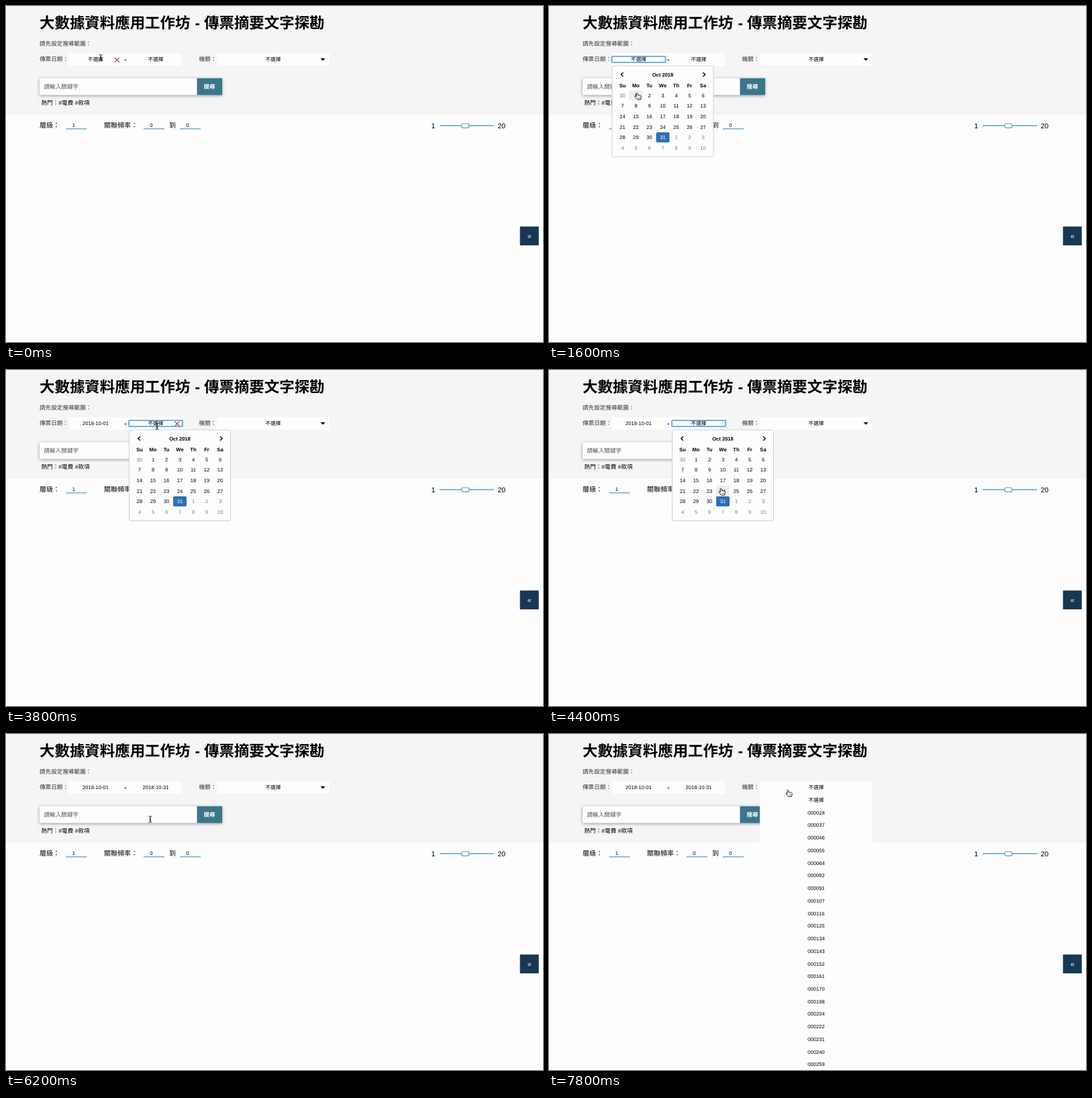
An HTML page that plays this animation: 800 px wide and 500 px high, repeating every 8000 ms.

```html
<!DOCTYPE html>
<html lang="zh-TW">
<head>
<meta charset="utf-8">
<style>
  html, body { margin: 0; width: 100%; height: 100%; overflow: hidden; background: #fdfdfe; }
  svg { display: block; font-family: "Liberation Sans", "Noto Sans CJK TC", "Noto Sans CJK", sans-serif; }
  text { white-space: pre; text-rendering: geometricPrecision; }
</style>
</head>
<body>
<svg id="stage" width="800" height="500" viewBox="0 0 800 500"></svg>
<script>
const LOOP = 8000, STEP = 200;
const stage = document.getElementById('stage');
const UNSET = '不選擇';
const CODES = [28, 37, 46, 55, 64, 82, 91, 107, 116, 125, 134, 143, 152, 161, 170, 198, 204, 222, 231, 240, 259];

// Pointer hot spot: time, x, y
const PATH = [
  [0, 141, 77], [800, 141, 77], [1400, 131, 129], [1800, 131, 129],
  [2600, 217, 86], [3000, 219, 87], [3200, 225, 84], [3800, 225, 84],
  [4600, 262, 193], [5000, 263, 193], [5400, 263, 193],
  [6200, 215, 127], [6600, 215, 127], [7400, 356, 83], [LOOP, 356, 83]
];

// y is the vertical middle of the glyphs
function label(x, y, str, size, { fill = '#000', weight = 500, anchor = 'start' } = {}) {
  return `<text x="${x}" y="${y + size * .36}" font-size="${size}" fill="${fill}" font-weight="${weight}" text-anchor="${anchor}">${str}</text>`;
}
const centered = (x, y, str, size = 7.6, opts = {}) => label(x, y, str, size, { anchor: 'middle', ...opts });
const rect = (x, y, w, h, fill, more = '') => `<rect x="${x}" y="${y}" width="${w}" height="${h}" fill="${fill}" ${more}/>`;
const line = (d, color, width = 1.3) => `<path d="${d}" fill="none" stroke="${color}" stroke-width="${width}"/>`;
const inside = (p, x, y, w, h) => p.x >= x && p.x < x + w && p.y >= y && p.y < y + h;

function pointerAt(t) {
  const i = PATH.findIndex(k => k[0] > t);
  const [t0, x0, y0] = PATH[i - 1], [t1, x1, y1] = PATH[i];
  const u = (t - t0) / (t1 - t0), e = u * u * (3 - 2 * u);
  return { x: x0 + (x1 - x0) * e, y: y0 + (y1 - y0) * e };
}

function header() {
  const big = { weight: 700 }, soft = { fill: '#333' };
  return rect(0, 0, 800, 162, '#f5f5f6')
    + label(50, 25, '大數據資料應用工作坊', 22.45, big)
    + label(281.5, 25, '-', 22.45, big)
    + label(295, 25, '傳票摘要文字探勘', 22.45, big)
    + label(50, 56, '請先設定搜尋範圍：', 8.6, soft)
    + label(50, 79, '傳票日期：', 8.6, soft)
    + label(287.5, 79, '機關：', 8.6, soft)
    + rect(94, 70, 168, 19, '#fdfdfe')
    + rect(314, 70, 168, 19, '#fdfdfe')
    + centered(178, 79.5, '-', 10, { weight: 700 })
    + centered(398, 79.5, UNSET)
    + '<path d="M468.5 77.8h7l-3.5 3.8z" fill="#000"/>'
    + rect(50, 107.5, 272, 25, '#fdfdfe', 'style="filter:drop-shadow(0 1px 2px #0006)"')
    + rect(284.5, 107.5, 37.5, 25, '#3a758a')
    + label(56.5, 120, '請輸入關鍵字', 8.6, { fill: '#555' })
    + centered(303, 120, '搜尋', 8.6, { fill: '#fff', weight: 700 })
    + label(52.5, 144, '熱門：#電費 #款項', 8.6);
}

function controls() {
  const blue = '#5ba3c2';
  return label(50, 177, '層級：', 10)
    + label(146, 177, '關聯頻率：', 10)
    + label(243, 177, '到', 10)
    + [[89.5, 1], [205, 0], [259, 0]].map(([x, n]) =>
      line(`M${x} 182.8h31`, blue) + centered(x + 11.3, 177, n)).join('')
    + label(633.5, 178, '1', 10.5) + label(732.5, 178, '20', 10.5)
    + line('M646 178H727', blue)
    + rect(678.5, 175, 11.5, 6.3, '#fdfdfe', `rx="3" stroke="${blue}" stroke-width="1.2"`)
    + rect(765.7, 328.2, 28, 28, '#173753')
    + centered(779.8, 341.8, '«', 11, { fill: '#fff' });
}

function dateField(x, value, focused, hovered) {
  return (focused ? rect(x, 75, 80, 9, '#fdfdfe', 'rx="1" stroke="#72b4ea" stroke-width="2.2"') : '')
    + centered(x + 40, 79.5, value)
    + (hovered ? line(`M${x + 68.5} 76.7l7 7m0-7l-7 7`, '#b5362a', 1.2) : '');
}

function cellAt(p, x) {
  const col = Math.floor((p.x - x - 5.5) / 20), row = Math.floor((p.y - 125.3) / 15.6);
  return col >= 0 && col < 7 && row >= 0 && row < 6 ? row * 7 + col : -1;
}

function calendar(x, hoverCell) {
  const bold = { weight: 700 };
  let out = rect(x + .5, 89, 151, 135.5, '#fdfdfe', 'rx="2.5" stroke="#d0d0d2" stroke-width="1"')
    + `<path d="M${x + 5} 89.6l5-4.5l5 4.5" fill="#f5f5f6" stroke="#ddd" stroke-width=".6"/>`
    + line(`M${x + 17} 99l-3.2 3l3.2 3M${x + 136} 99l3.2 3l-3.2 3`, '#000', 1.4)
    + centered(x + 76, 102, 'Oct 2018', 7.6, bold);
  ['Su', 'Mo', 'Tu', 'We', 'Th', 'Fr', 'Sa'].forEach((d, i) => out += centered(x + 16 + i * 20, 118, d, 7.6, bold));
  for (let i = 0; i < 42; i++) {
    const cx = x + 16 + i % 7 * 20, cy = 133 + Math.floor(i / 7) * 15.6;
    const selected = i === 31, otherMonth = i < 1 || i > 31;
    const day = i < 1 ? 30 : i > 31 ? i - 31 : i;
    if (selected || i === hoverCell) out += rect(cx - 10, cy - 7.5, 20, 15, selected ? '#2e6fb5' : '#ededee', 'rx="2"');
    out += centered(cx, cy, day, 7.6, { fill: selected ? '#fff' : otherMonth ? '#7c7c7e' : '#000' });
  }
  return out;
}

function dropdown() {
  return rect(314, 70, 168, 430, '#fdfdfe') + centered(398, 79.5, UNSET)
    + [UNSET, ...CODES.map(c => String(c).padStart(6, '0'))]
      .map((s, i) => centered(398, 98.3 + i * 18.73, s)).join('');
}

const POINTERS = {
  text: line('M-2.5-4.8q2.5 0 2.5 1.5v6.6q0 1.5-2.5 1.5M2.5-4.8q-2.5 0-2.5 1.5v6.6q0 1.5 2.5 1.5M-1.2 1.8h2.4', '#222', .9),
  arrow: '<path d="M0 0v9l2.1-1.9l1.6 3.6l1.6-.7l-1.6-3.4h2.8z" fill="#000" stroke="#fff" stroke-width=".6"/>',
  hand: '<path d="M-1.3 1q.9-1.3 1.9 0l.9 2.7l3.2.3q1.6.5 1.5 2.2l-.8 3.9h-4.8l-3.6-4.3q-.4-1.5 1.2-1l1.3.7z" fill="#fff" stroke="#222" stroke-width="1" stroke-linejoin="round"/>'
    + line('M2 6.4v2.2M3.7 6.4v2.2', '#222', .6)
};
const pointer = (p, kind) => `<g transform="translate(${p.x} ${p.y})">${POINTERS[kind]}</g>`;

function draw(t) {
  const p = pointerAt(t);
  const openFirst = t >= 800 && t < 1800, openSecond = t >= 3400 && t < 4800, openSelect = t >= 7600;
  const over = x => inside(p, x, 74, 80, 10.5);
  const calendarX = openFirst ? 93.5 : openSecond ? 183 : null;
  const overCalendar = calendarX !== null && inside(p, calendarX, 89, 152, 136);
  const cell = overCalendar ? cellAt(p, calendarX) : -1;

  let kind = 'arrow';
  if (overCalendar) kind = cell >= 0 ? 'hand' : 'arrow';
  else if (over(93.5) || over(183) || inside(p, 50, 107, 234, 26)) kind = 'text';
  else if (inside(p, 314, 70, 168, 19) || inside(p, 284, 107, 38, 26)) kind = 'hand';

  stage.innerHTML = header() + controls()
    + dateField(93.5, t < 1800 ? UNSET : '2018-10-01', openFirst, over(93.5))
    + dateField(183, t < 4800 ? UNSET : '2018-10-31', openSecond, over(183))
    + (calendarX !== null ? calendar(calendarX, cell) : '')
    + (openSelect ? dropdown() : '')
    + pointer(p, kind);
}

let shown = -1;
function tick() {
  const t = Math.floor(performance.now() % LOOP / STEP) * STEP;
  if (t !== shown) draw(shown = t);
  requestAnimationFrame(tick);
}
tick();
</script>
</body>
</html>
```
